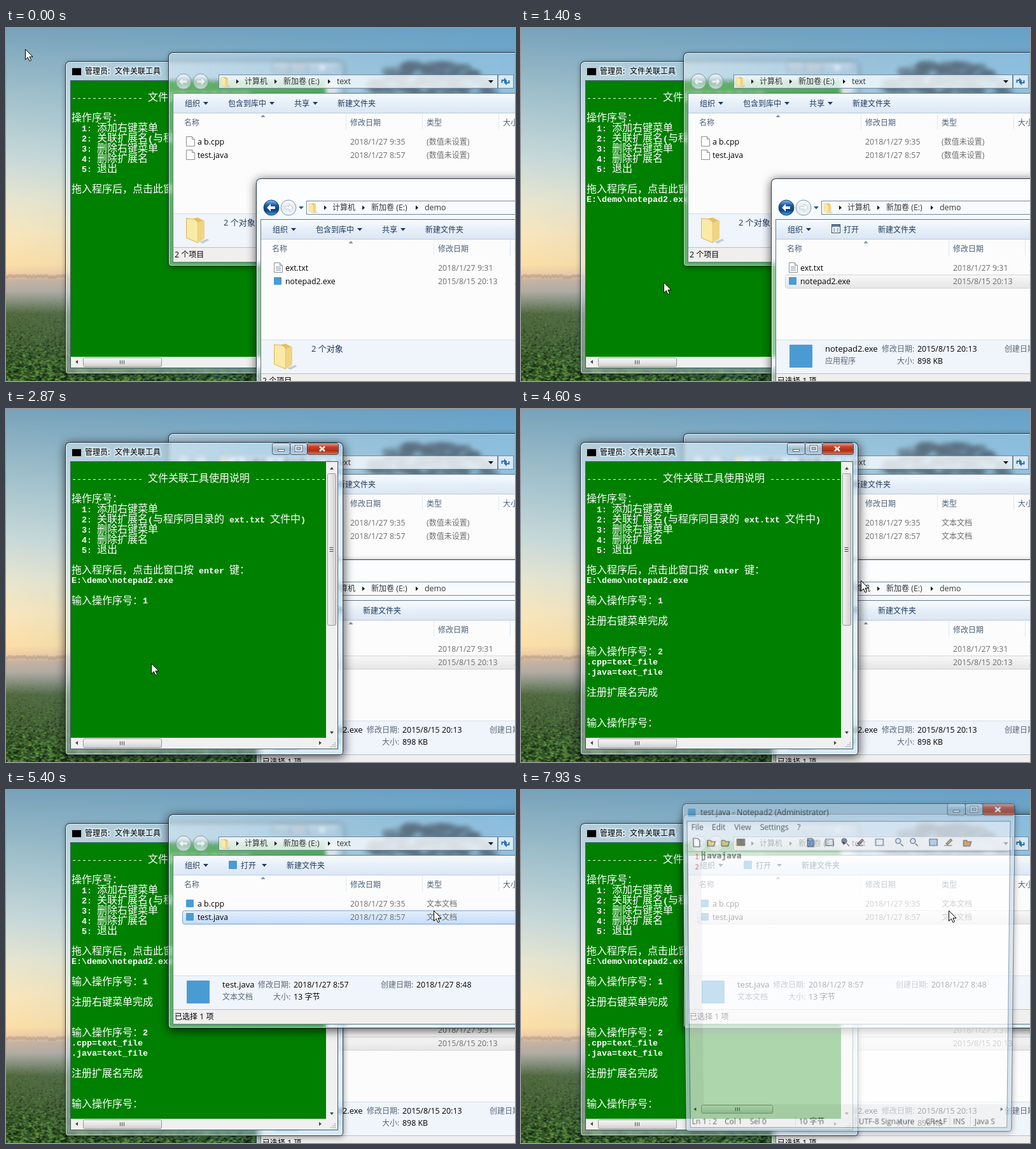
An HTML page with a canvas for the animation above (8000 ms loop, 800 by 554 pixels).

```html
<!DOCTYPE html>
<html lang="zh-CN">
<head>
<meta charset="utf-8">
<title>文件关联工具</title>
<style>
html, body { margin: 0; width: 100%; height: 100%; overflow: hidden; }
#stage { position: relative; width: 800px; height: 554px; overflow: hidden; background: #9cb9c6; }
#stage > *, .win > svg { position: absolute; left: 0; top: 0; }
.win { width: 800px; height: 554px; }
.glass {
  position: absolute; box-sizing: border-box; border: 1px solid rgba(16,34,48,.88);
  border-radius: 7px 7px 5px 5px; backdrop-filter: blur(3px);
  background: linear-gradient(100deg, rgba(240,247,252,.42), rgba(205,232,250,.36) 50%, rgba(175,220,252,.38));
  box-shadow: inset 0 0 0 1px rgba(255,255,255,.62), 1px 2px 9px rgba(0,0,0,.4);
}
#demo .glass { background: rgba(250,253,255,.6); }
.active .glass { box-shadow: inset 0 0 0 1px rgba(255,255,255,.72), 1px 3px 15px 1px rgba(0,0,0,.66); }
text { font: 12.4px "Open Sans", "Noto Sans CJK SC", "Noto Sans CJK", sans-serif; white-space: pre; fill: #000; }
.cjk { font-family: "Noto Sans CJK SC", "Noto Sans CJK", sans-serif; font-size: 12px; font-weight: 400; }
.bar { fill: #1e395b; }
.head { fill: #4c607a; }
.dim { fill: #6d6d6d; }
.label { fill: #5a6779; }
.addr { fill: #333; }
.name { font-size: 13px; }
.info { fill: #1e395b; font-size: 13px; }
.info .cjk { font-size: 13px; }
.glow { paint-order: stroke; stroke: rgba(255,255,255,.35); stroke-width: 5px; stroke-linejoin: round; }
.tty text { font: bold 13.333px "Liberation Mono", "DejaVu Sans Mono", monospace; fill: #fff; }
.tty .cjk { font-size: 16px; }
.tty .thin { font-weight: 400; }
#np text { font-size: 12px; fill: #222; }
#np .code { font: bold 12.8px "DejaVu Sans Mono", monospace; fill: #444; }
#np .num { font: 11px "DejaVu Sans Mono", monospace; fill: #c0392b; }
#np { transform-origin: 515px 279px; }
#np .glass { backdrop-filter: none; background: linear-gradient(#a3c3d8, #c8dcea 30px, #c3d9e6); }
#cursor { overflow: visible; z-index: 9; }
</style>
</head>
<body>
<div id="stage"><canvas id="bg" width="800" height="554"></canvas></div>
<script>
const LOOP = 8000, STEP = 1000 / 15;
const stage = document.getElementById('stage');

// markup helpers; y is the vertical middle of a line
const at = (from, to, s) => `<g data-t="${from},${to}">${s}</g>`;
const wrap = s => s.replace(/[\u3000-\u9fff\uff00-\uffef]+/g, '<tspan class="cjk">$&</tspan>');
const text = (x, y, s, c = '') => `<text x="${x}" y="${y + 4.5}" class="${c}">${wrap(s)}</text>`;
const rect = (x, y, w, h, fill, more = '') =>
  `<rect x="${x}" y="${y}" width="${w}" height="${h}" fill="${fill}" ${more}/>`;
const box = (x, y, w, h, fill, line, r = 0) =>
  rect(x + .5, y + .5, w - 1, h - 1, fill, `stroke="${line}" rx="${r}"`);
const path = (d, fill, line = 'none', more = '') => `<path d="${d}" fill="${fill}" stroke="${line}" ${more}/>`;
const down = (x, y, c = '#1e395b', r = 4) => path(`M${x - r} ${y - 2}h${2 * r}l${-r} ${r + .5}z`, c);
const right = (x, y, c = '#111') => path(`M${x - 2} ${y - 3.5}v7l4-3.5z`, c);
const glass = (x, y, w, h) => `<div class="glass" style="left:${x}px;top:${y}px;width:${w}px;height:${h}px"></div>`;
const svg = (s, c = '') => `<svg class="${c}" width="800" height="554">${s}</svg>`;
const put = (x, y, k, s) => `<g transform="translate(${x} ${y}) scale(${k})">${s}</g>`;
const fade = (id, ...stops) => `<linearGradient id="${id}" x2="0" y2="1">${stops.map((c, i) =>
  `<stop offset="${i / (stops.length - 1)}" stop-color="${c}"/>`).join('')}</linearGradient>`;

const page = (x, y, lines) => put(x - 1, y, 1,
  path('M.5.5h9l4 4v11h-13z', '#fff', '#8d8d8d') + path('M9.5.5v4h4', '#e8e8e8', '#8d8d8d') +
  (lines ? path('M3 6.5h8M3 8.5h8M3 10.5h8M3 12.5h8', 'none', '#9aa7b5') : ''));
const app = (x, y, s) => rect(x, y, s, s, '#4b9bd3', 'rx="1"');
const program = (x, y) => box(x, y, 14, 14, '#fff', '#33475f') + rect(x + 1, y + 1, 12, 3, '#5d7f9f') +
  path(`M${x + 3} ${y + 7.5}h8m-8 3h8`, 'none', '#33475f', 'stroke-dasharray="3 2"');
const folder = (x, y, k) => put(x, y, k,
  path('M3 2l5-1 4 2v10l-4 2z', '#e3bf62') + path('M1 1.5l5 .5 2 1.500v13l-7-3z', '#fbe9a8', '#d9b75c', 'stroke-width=".4"') +
  path('M8 4l4-1.500v11.500l-4 2.500z', '#f0d482') + path('M9 16l5-2 1 1-4 2z', 'rgba(120,130,140,.35)'));

function explorer(id, dx, dy, o) {
  const orb = (x, on, flip) => put(x, 84, 1,
    `<circle r="12" fill="${on ? 'url(#orb)' : 'url(#orbOff)'}" stroke="${on ? '#16406f' : '#7f93a3'}"/>` +
    path('M-7 0l6-6v4h7v4h-7v4z', on ? '#fff' : 'rgba(255,255,255,.75)', on ? 'none' : '#c3ced6', flip ? 'transform="scale(-1)"' : ''));
  const plain = text(349, 118, '包含到库中', 'bar') + down(418, 118) + text(453, 118, '共享', 'bar') +
    down(486, 118) + text(521, 118, '新建文件夹', 'bar');
  const picked = (o.menu ? app(350, 111, 13) : program(350, 110)) + text(369, 118, '打开', 'bar') +
    (o.menu ? down(406, 118) : '') + text(o.menu ? 441 : 423, 118, '新建文件夹', 'bar');
  const k = o.shift;
  const detail = app(284, 299, 36) + text(340, 305, o.name, 'name') + text(396 + k, 305, '修改日期:', 'label') +
    text(452 + k, 305, o.rows[1].date) + text(589 + k, 305, '创建日期:', 'label') + text(645 + k, 305, o.made) +
    text(340, 324, o.kind, 'label') + text(420 + k, 324, '大小:', 'label') + text(452 + k, 324, o.size);
  const mark = (fill, line) => box(277, 189, 560, 22, fill, line, 3);
  const rows = o.rows.map((r, i) => {
    const y = 178 + 21 * i;
    return r.icon(284, y - 8) + text(301, y, r.name) + text(541, y, r.date, 'dim') + r.kind(y);
  }).join('');
  return `<div class="win" id="${id}">${glass(255 + dx, 38 + dy, 561, 336)}` + svg(`<g transform="translate(${dx} ${dy})">` +
    orb(279, o.back) + orb(306, false, true) + down(326, 84, o.back ? '#1f5c99' : '#9fb0bd') +
    box(334, 73, 439, 22, 'rgba(247,250,253,.8)', '#72889b') + box(773, 73, 25, 22, 'rgba(247,250,253,.72)', '#72889b') +
    folder(337, 76, 1) + right(364, 84) + text(375, 83, '计算机', 'addr') + right(424, 84) +
    text(436, 83, '新加卷 (E:)', 'addr') + right(508, 84) + text(520, 83, o.dir, 'addr') + down(762, 84, '#111') +
    path('M779.500 86v-4h4M790.500 82v4h-4', 'none', '#2d70b3', 'stroke-width="2"') +
    path('M783 78l4 4-4 4zM787 82l-4 4 4 4z', '#2d70b3') +
    box(262, 102, 560, 266, '#fcfcfc', '#5c7488') +
    rect(263, 103, 560, 31, 'url(#tool)') + rect(263, 133, 560, 1, '#b9cadd') +
    text(281, 118, '组织', 'bar') + down(314, 118) + at(0, o.sel, plain) + at(o.sel, LOOP, picked) +
    [534, 654, 774].map(x => rect(x, 135, 1, 24, '#dde8f3')).join('') +
    path('M400.500 140l3.500-4 3.500 4z', '#7d93a8') +
    text(280, 148, '名称', 'head') + text(541, 148, '修改日期', 'head') +
    text(661, 148, '类型', 'head') + text(781, 148, '大小', 'head') +
    at(o.sel, o.blur, mark('url(#sel)', '#7da2ce')) + at(o.blur, LOOP, mark('url(#selOff)', '#d5d5d5')) + rows +
    rect(263, 291, 560, 54, '#f0f4fb') + rect(263, 291, 560, 1, '#d3dfee') +
    at(0, o.detail, folder(281, 295, 2.55) + text(342, 305, '2 个对象', 'info')) + at(o.detail, LOOP, detail) +
    rect(263, 344, 560, 1, '#b8c0c8') + rect(263, 345, 560, 22, '#f1eeee') +
    at(0, o.detail, text(265, 355, '2 个项目')) + at(o.detail, LOOP, text(265, 355, '已选择 1 项')) + '</g>') + '</div>';
}

const kindOf = s => y => text(661, y, s, 'dim');
const assoc = 4330;
const lateKind = y => at(0, assoc, text(661, y, '(数值未设置)', 'dim')) + at(assoc, LOOP, text(661, y, '文本文档', 'dim'));
const lateIcon = (x, y) => at(0, assoc, page(x, y)) + at(assoc, LOOP, app(x - 1, y + 2, 12));

const textWin = explorer('text', 0, 0, {
  dir: 'text', sel: 5200, detail: 5400, blur: 7870, menu: true, shift: 0,
  name: 'test.java', kind: '文本文档', made: '2018/1/27 8:48', size: '13 字节',
  rows: [{ name: 'a b.cpp', date: '2018/1/27 9:35', icon: lateIcon, kind: lateKind },
         { name: 'test.java', date: '2018/1/27 8:57', icon: lateIcon, kind: lateKind }]
});
const demoWin = explorer('demo', 138, 198, {
  dir: 'demo', sel: 730, detail: 800, blur: 1330, back: true, shift: 33,
  name: 'notepad2.exe', kind: '应用程序', made: '2015/8/15 20:13', size: '898 KB',
  rows: [{ name: 'ext.txt', date: '2018/1/27 9:31', icon: (x, y) => page(x, y, true), kind: kindOf('文本文档') },
         { name: 'notepad2.exe', date: '2015/8/15 20:13', icon: (x, y) => app(x - 1, y + 2, 12), kind: kindOf('应用程序') }]
});

function titleButtons(x, y, close) {
  const b = (dx, w, fill) => box(x + dx, y, w, 19, fill, 'rgba(40,60,78,.75)', 3);
  return b(0, 29, 'url(#btn)') + b(28, 28, 'url(#btn)') + b(55, 50, close) +
    rect(x + 9.5, y + 10.5, 10, 3, '#fff', 'stroke="#445" stroke-width=".8"') +
    rect(x + 37.5, y + 5.5, 9, 7, 'none', 'stroke="#445" stroke-width="3.500"') +
    rect(x + 37.5, y + 5.5, 9, 7, 'none', 'stroke="#fff" stroke-width="2"') +
    path(`M${x + 75} ${y + 6}l8 7m0-7l-8 7`, 'none', '#fff', 'stroke-width="2.400"');
}

// console lines: [row, text, time shown]
const lines = [
  [1, '-------------- 文件关联工具使用说明 --------------', 0, 'thin'],
  [3, '操作序号：', 0], [4, '  1: 添加右键菜单', 0], [5, '  2: 关联扩展名(与程序同目录的 ext.txt 文件中)', 0],
  [6, '  3: 删除右键菜单', 0], [7, '  4: 删除扩展名', 0], [8, '  5: 退出', 0],
  [10, '拖入程序后，点击此窗口按 enter 键：', 0], [11, 'E:\\demo\\notepad2.exe', 1400],
  [13, '输入操作序号：', 2800], [15, '注册右键菜单完成', 3200],
  [18, '输入操作序号：', 3270], [19, '.cpp=text_file', 3670], [20, '.java=text_file', 3730],
  [22, '注册扩展名完成', 3800], [25, '输入操作序号：', 3870]
];
const key = (row, s, from) => at(from, LOOP, `<text x="215" y="${84 + 16 * row + 13}">${s}</text>`);
const line = ([row, s, from, c = '']) => at(from, LOOP,
  `<text x="103" y="${84 + 16 * row + (/[^\x00-\x7f]/.test(s) ? 14 : 13)}" class="${c}">${wrap(s)}</text>`);

const consoleWin = `<div class="win" id="con">${glass(93, 52, 437, 491)}` + svg(
  box(103, 62, 16, 13, '#000', '#b8c0c4') + text(124, 67, '管理员:', 'glow') + text(171, 67, '文件关联工具', 'glow') +
  at(0, 1530, titleButtons(418, 53, 'url(#btn)')) + at(1530, 5000, titleButtons(418, 53, 'url(#close)')) +
  at(5000, LOOP, titleButtons(418, 53, 'url(#btn)')) +
  box(101, 82, 421, 452, '#008000', 'rgba(50,75,92,.85)') +
  rect(503, 83, 18, 433, '#f0f0f0') + rect(102, 516, 419, 17, '#f0f0f0') +
  box(505, 101, 14, 239, 'url(#thumbV)', '#979797', 2) + box(121, 517, 124, 15, 'url(#thumb)', '#979797', 2) +
  path('M508.500 217.500h6m-6 3h6m-6 3h6M179.500 521.500v6m3-6v6m3-6v6', 'none', '#444') +
  path('M509 95l3-4 3 4zM509 506l3 4 3-4zM113 521l-4 3 4 3zM492 521l4 3-4 3z', '#444') +
  path('M510 530h9m-6-3h6m-3-3h3', 'none', '#bbb', 'stroke-width="2" stroke-dasharray="2 1"')) +
  svg(lines.map(line).join('') + key(13, '1', 2870) + key(18, '2', 3470) +
    at(2070, 2600, rect(263, 273, 7, 3, '#fff')) + at(4730, 5000, rect(215, 497, 7, 3, '#fff')), 'tty') + '</div>';

const glyph = (x, c, d) => put(x - 7, 76, 1, path(d, c, '#334', 'stroke-width="1.200"'));
const sheet = 'M2 1h7l3 3v10h-10z', tray = 'M1 4h5l1 2h6l-2 7h-10z', pane = 'M1 2h12v10h-12z',
  lens = 'M10 9l4 4M6 1a4 4 0 1 0 .1 0z', pen = 'M1 12h12M4 9l7-7 2 2-7 7z';
const icons = [[278, '#fff', sheet], [301, '#f4cf69', tray], [323, '#f4cf69', tray], [347, '#4a5568', pane],
  [456, '#5b8fd0', sheet], [485, '#dfe6ef', pane], [509, '#445a77', lens], [532, '#d06a5a', pen], [563, '#dce9f8', pane],
  [593, '#cfe6fa', lens], [616, '#cfe6fa', lens], [647, '#9cc3ee', pane], [670, '#e2b04a', pen], [700, '#c98545', tray]];

const noteWin = `<div class="win" id="np">${glass(256, 23, 518, 517)}` + svg(
  app(265, 31, 12) + text(284.5, 37, 'test.java - Notepad2 (Administrator)') + titleButtons(668, 23, 'url(#close)') +
  box(263, 50, 504, 484, '#fff', '#5c7488') + rect(264, 51, 502, 22, '#eef2f8') + rect(264, 73, 502, 24, '#f0f2f5') +
  [['File', 270], ['Edit', 302], ['View', 337], ['Settings', 377], ['?', 435]].map(([s, x]) => text(x, 60, s)).join('') +
  icons.map(i => glyph(...i)).join('') +
  rect(264, 97, 502, 1, '#a9b2bd') + rect(264, 98, 21, 398, '#f0f0f0') +
  text(275, 105, '1', 'num') + text(275, 121, '2', 'num') + text(286, 104, 'javajava', 'code') + rect(286, 97, 1, 15, '#000') +
  rect(264, 496, 502, 16, '#f0f0f0') + box(281, 497, 114, 14, 'url(#thumb)', '#979797', 2) +
  path('M335.500 501v6m3-6v6m3-6v6', 'none', '#444') + path('M273 501l-4 3 4 3zM756 501l4 3-4 3z', '#444') +
  rect(264, 512, 502, 21, '#f0f0f0') +
  [['Ln 1 : 2', 266], ['Col 1', 318], ['Sel 0', 358], ['10 字节', 436], ['UTF-8 Signature', 531], ['CR+LF', 637],
   ['INS', 681], ['Java S', 715]].map(([s, x]) => text(x, 523.5, s)).join('') +
  path('M430.500 515v16M526.500 515v16M631.500 515v16M675.500 515v16M708.500 515v16', 'none', '#ccc')) + '</div>';

const defs = `<svg width="0" height="0"><defs>` +
  fade('tool', '#f7fbfe', '#e6eff9', '#dbe6f3') + fade('sel', '#e3effd', '#c3dcfc') + fade('selOff', '#f8f8f8', '#e5e5e5') +
  fade('orb', '#8fc0e8', '#1b5ca8', '#0c3f86', '#3fa5e0') +
  fade('orbOff', 'rgba(255,255,255,.75)', 'rgba(205,218,228,.5)', 'rgba(240,246,250,.7)') +
  fade('btn', 'rgba(240,247,252,.75)', 'rgba(150,175,195,.6)', 'rgba(190,212,228,.65)') +
  fade('close', '#e8a493', '#c4402a', '#b02f17', '#dd7a55') + fade('thumb', '#f5f5f5', '#e6e6e6', '#cfcfcf') +
  `<linearGradient id="thumbV"><stop stop-color="#f5f5f5"/><stop offset="1" stop-color="#cfcfcf"/></linearGradient></defs></svg>`;

const cursor = '<svg id="cursor" width="1" height="1">' +
  path('M.5.5v16.200l3.800-3.600 2.700 5.800 2.600-1.200-2.700-5.600h5.200z', '#fff', '#000') +
  at(7800, 7870, '<circle cx="13" cy="-1" r="6" fill="none" stroke="#4aa8d8" stroke-width="4"/>' +
    path('M8 -4a6 6 0 0 1 9 -1', 'none', '#b5e6f5', 'stroke-width="2.500"')) + '</svg>';

stage.insertAdjacentHTML('beforeend', defs + consoleWin + textWin + demoWin + noteWin + cursor);

function paintBackground() {
  const g = document.getElementById('bg').getContext('2d');
  const fill = (x2, y2, stops) => {
    const grad = g.createLinearGradient(0, 0, x2, y2);
    stops.forEach(([p, c]) => grad.addColorStop(p, c));
    g.fillStyle = grad;
    g.fillRect(0, 0, 800, 554);
  };
  fill(0, 554, [[0, '#78a2ba'], [.18, '#9fbfca'], [.36, '#c6d8d8'], [.48, '#e6e5d0'], [.58, '#f8e6bc'], [.67, '#fddfa6'],
    [.695, '#f0cda6'], [.715, '#c8b3a0'], [.745, '#b3aca2'], [.775, '#87907c'], [.81, '#52693f'], [1, '#2f4f22']]);
  fill(800, 0, [[0, 'rgba(85,160,212,0)'], [1, 'rgba(85,160,212,.5)']]);
  let seed = 7;
  const rnd = () => (seed = seed * 16807 % 2147483647) / 2147483647;
  // tree: a domed crown over a wider dark base
  for (let i = 0; i < 150; i++) {
    const a = -rnd() * 3.14, r = Math.sqrt(rnd());
    g.fillStyle = `rgba(30,46,58,${.3 + rnd() * .4})`;
    g.beginPath();
    g.ellipse(667 + Math.cos(a) * r * 100, 103 + Math.sin(a) * r * 50, 10, 6, 0, 0, 7);
    g.fill();
  }
  g.fillStyle = 'rgba(150,120,104,.3)';
  for (let x = 0; x < 100; x += 3) g.fillRect(x, 389 - rnd() * 3, 3, 5);
  for (let i = 0; i < 6000; i++) {
    const d = Math.pow(rnd(), .8), s = 1 + d * 2.4;
    const shade = rnd(), y = 424 + d * 132;
    g.fillStyle = shade < .45 ? `rgba(14,34,10,${.1 + d * .45})` : `rgba(${70 + shade * 45},${122 + shade * 50},${42 + shade * 36},${.1 + d * .45})`;
    g.fillRect(rnd() * 420, y, s * 1.3, s * .8);
  }
}
paintBackground();

// pointer stops: time, x, y, eased arrival
const stops = [[0, 30, 33], [730, 452, 396, 1], [900, 452, 396], [1330, 224, 399, 1], [1670, 224, 399], [1870, 228, 399],
  [4200, 228, 399], [4600, 534, 269], [4800, 672, 189], [LOOP, 672, 189]];
function pointer(t) {
  const i = stops.findIndex(s => s[0] > t), a = stops[i - 1], b = stops[i];
  let p = (t - a[0]) / (b[0] - a[0]);
  if (b[3]) p = p * p * (3 - 2 * p);
  return [1, 2].map(n => Math.round(a[n] + (b[n] - a[n]) * p));
}

const timed = [...document.querySelectorAll('[data-t]')].map(el => [el, ...el.dataset.t.split(',').map(Number)]);
const [con, txt, demo, np, cur] = ['con', 'text', 'demo', 'np', 'cursor'].map(id => document.getElementById(id));

function draw(t) {
  for (const [el, from, to] of timed) el.style.display = t >= from && t < to ? '' : 'none';
  const order = t < 1530 ? [con, txt, demo] : t < 5000 ? [txt, demo, con] : [demo, con, txt];
  order.forEach((w, i) => {
    w.style.zIndex = i + 1;
    w.classList.toggle('active', i === 2);
  });
  const late = t >= 7930;
  np.style.display = t >= 7870 ? '' : 'none';
  np.style.zIndex = 5;
  np.style.opacity = late ? .68 : .3;
  np.style.transform = `perspective(2000px) rotateX(${late ? -5 : -9}deg) scale(${late ? 1 : .98})`;
  const [x, y] = pointer(Math.min(Math.floor((t + 4) / STEP) * STEP, LOOP - 1));
  cur.style.transform = `translate(${x}px, ${y}px)`;
}

const start = performance.now();
function tick() {
  draw((performance.now() - start) % LOOP);
  requestAnimationFrame(tick);
}
tick();
</script>
</body>
</html>
```
